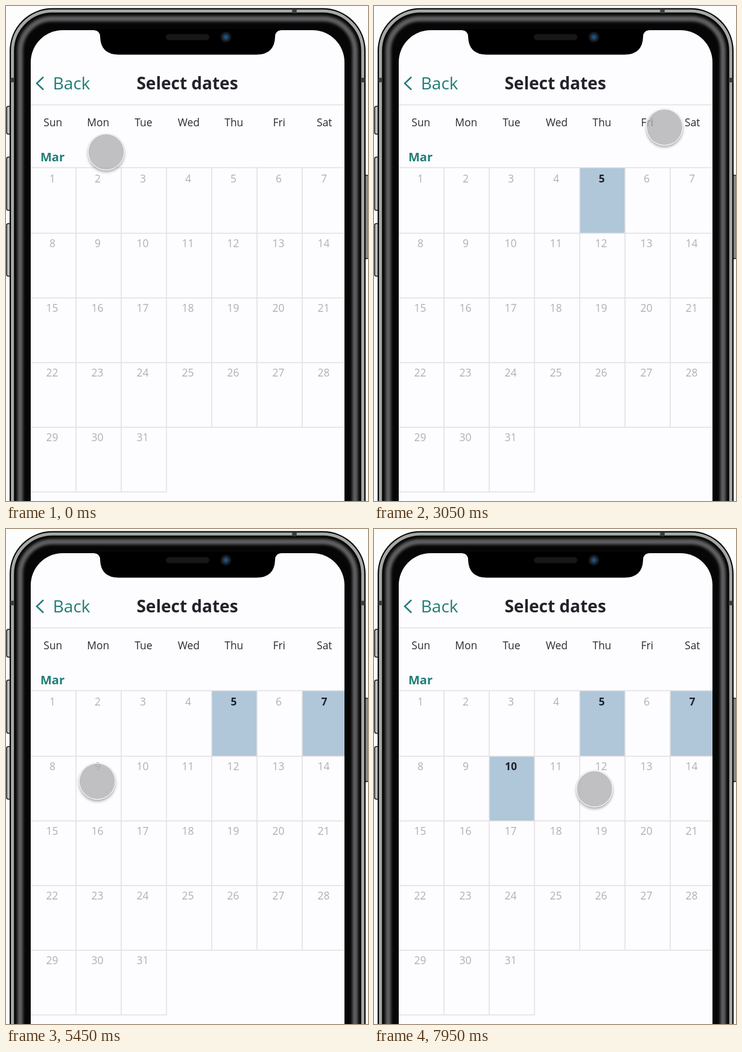
An HTML page for the animation above (8 s loop, 600 by 819 pixels).

```html
<!DOCTYPE html>
<html lang="en">
<head>
<meta charset="utf-8">
<title>Select dates</title>
<style>
  html, body { margin: 0; width: 100%; height: 100%; overflow: hidden; background: #fdfdfe; }
  svg { position: absolute; left: 0; top: 0; font-family: "Open Sans", sans-serif; }
  .mid { text-anchor: middle; }
  .small { font-size: 17.4px; }
  #dot {
    position: absolute; left: -30.5px; top: -30.5px; width: 61px; height: 61px;
    box-sizing: border-box; border: 1.5px solid #fbfbfb; border-radius: 50%;
    background: rgba(174, 174, 176, .76) padding-box;
    box-shadow: 0 3px 4px rgba(0, 0, 0, .3), 0 0 1px rgba(0, 0, 0, .35);
  }
</style>
</head>
<body>
<svg width="600" height="819" viewBox="0 0 600 819">
  <defs>
    <filter id="soft" x="-5%" y="-5%" width="110%" height="110%"><feGaussianBlur stdDeviation="2.2"/></filter>
    <radialGradient id="lens">
      <stop offset="0" stop-color="#2f5c88"/>
      <stop offset=".5" stop-color="#1a3550"/>
      <stop offset=".8" stop-color="#10151d"/>
      <stop offset="1" stop-color="#17181b"/>
    </radialGradient>
  </defs>
  <g fill="#b9bbb9" stroke="#1a1a1a" stroke-width="1.5">
    <rect x="1" y="166" width="10" height="46" rx="3"/>
    <rect x="1" y="250" width="10" height="88" rx="3"/>
    <rect x="1" y="360" width="10" height="87" rx="3"/>
    <rect x="590" y="280" width="11" height="138" rx="3" fill="#888"/>
  </g>
  <g id="rim" fill="none"></g>
  <path d="M478 5V12M7 122.500H14M588 122.500H595" stroke="#3a3c3a" stroke-width="7.500"/>
  <rect x="41" y="40" width="520" height="900" rx="53" fill="#fdfcfe"/>
  <path d="M146 38V40Q156 41 156 51Q157 80.500 187 80.500H415Q445 80.500 446 51Q446 41 456 40V38Z"/>
  <rect x="265" y="46.500" width="72" height="10" rx="5" fill="#171718"/>
  <circle cx="364.500" cy="51.500" r="9" fill="url(#lens)"/>
  <path d="M62 117.500L51 128L62 138.500" fill="none" stroke="#1f7d77" stroke-width="2.500"/>
  <text x="77.700" y="138" font-size="28" fill="#1f7d77">Back</text>
  <text class="mid" x="300.500" y="138" font-size="28" font-weight="700" fill="#22222a">Select dates</text>
  <text x="57" y="257" font-size="20" font-weight="700" fill="#1f7d77">Mar</text>
  <g id="cells"></g>
  <g id="lines" stroke="#e0dfe2" stroke-width="1.5"></g>
  <g id="labels"></g>
</svg>
<div id="dot"></div>
<script>
const $ = id => document.getElementById(id);

function add(parent, tag, attrs, text = '') {
  const el = document.createElementNS('http://www.w3.org/2000/svg', tag);
  for (const k in attrs) el.setAttribute(k, attrs[k]);
  el.textContent = text;
  return $(parent).appendChild(el);
}

const rim = (inset, style) => add('rim', 'rect',
  { x: 6 + inset, y: 3.5 + inset, width: 590 - 2 * inset, height: 1000, rx: 71 - inset, ...style });
rim(0, { fill: '#060606' });
rim(4.7, { stroke: '#a5a8a5', 'stroke-width': 5 });
rim(17.5, { stroke: '#616163', 'stroke-width': 9, filter: 'url(#soft)' });

const line = (x1, y1, x2, y2) => add('lines', 'line', { x1, y1, x2, y2 });
const label = (x, y, text, fill, weight = 400) =>
  add('labels', 'text', { class: 'mid small', x, y, fill, 'font-weight': weight }, text);

const colX = col => 41 + 75 * col;
const rowY = row => row ? 269 + 107 * row : 267.5;

line(41, 163.5, 561, 163.5);
for (let row = 0; row < 6; row++) line(41, rowY(row), row < 5 ? 561 : 266.7, rowY(row));
for (let col = 1; col < 7; col++) line(colX(col), 268, colX(col), rowY(col < 4 ? 5 : 4));

['Sun', 'Mon', 'Tue', 'Wed', 'Thu', 'Fri', 'Sat'].forEach((name, col) =>
  label(colX(col) + 36.8, 199, name, '#2b2b30'));

// Day number -> time at which it starts to turn selected
const picks = { 5: 1100, 7: 3500, 10: 7050 };
const marks = [];
for (let day = 1; day <= 31; day++) {
  const col = (day - 1) % 7, row = Math.floor((day - 1) / 7);
  const x = colX(col) + (day > 9 ? 35.5 : 36), y = 292 + 107 * row;
  const plain = label(x, y, day, '#b0afb2');
  if (!picks[day]) continue;
  const cell = add('cells', 'rect', {
    x: colX(col), y: rowY(row), width: Math.min(75, 561 - colX(col)),
    height: rowY(row + 1) - rowY(row), fill: '#afc7d9'
  });
  marks.push({ start: picks[day], plain, cell, bold: label(x + 0.5, y, day, '#1f1f28', 700) });
}

// Pointer moves: start, end, bend point, end point; at rest in between
const home = [165.5, 241];
const moves = [
  [0, 650, [-4, 45], [363, 301]],
  [750, 950, [366, 305], [368, 308]],
  [1600, 2200, [440, 325], [360, 331]],
  [2200, 2450, [362, 336], [367, 338]],
  [2550, 3300, [444, -4], [521, 326]],
  [4150, 5100, [326, 365], [131, 404.5]],
  [5100, 5900, [131, 425], [250.5, 420]],
  [7500, 7950, [308, 425], [365, 429.5]]
];

const clamp = u => Math.max(0, Math.min(1, u));
const ease = u => u * u * (3 - 2 * u);

function pointer(t) {
  let pos = home;
  for (const [start, end, bend, goal] of moves) {
    const u = ease(clamp((t - start) / (end - start))), v = 1 - u;
    pos = pos.map((p, i) => p * v * v + 2 * bend[i] * u * v + goal[i] * u * u);
  }
  return pos;
}

function draw(t) {
  for (const { start, plain, cell, bold } of marks) {
    const p = clamp((t - start) / 100);
    cell.style.opacity = bold.style.opacity = p;
    plain.style.opacity = 1 - p;
  }
  const [x, y] = pointer(t);
  $('dot').style.transform = `translate(${x}px, ${y}px)`;
}

const begin = performance.now();
function tick() {
  const t = (performance.now() - begin) % 8000;
  draw(Math.floor(t / 50) * 50);
  requestAnimationFrame(tick);
}
tick();
</script>
</body>
</html>
```
